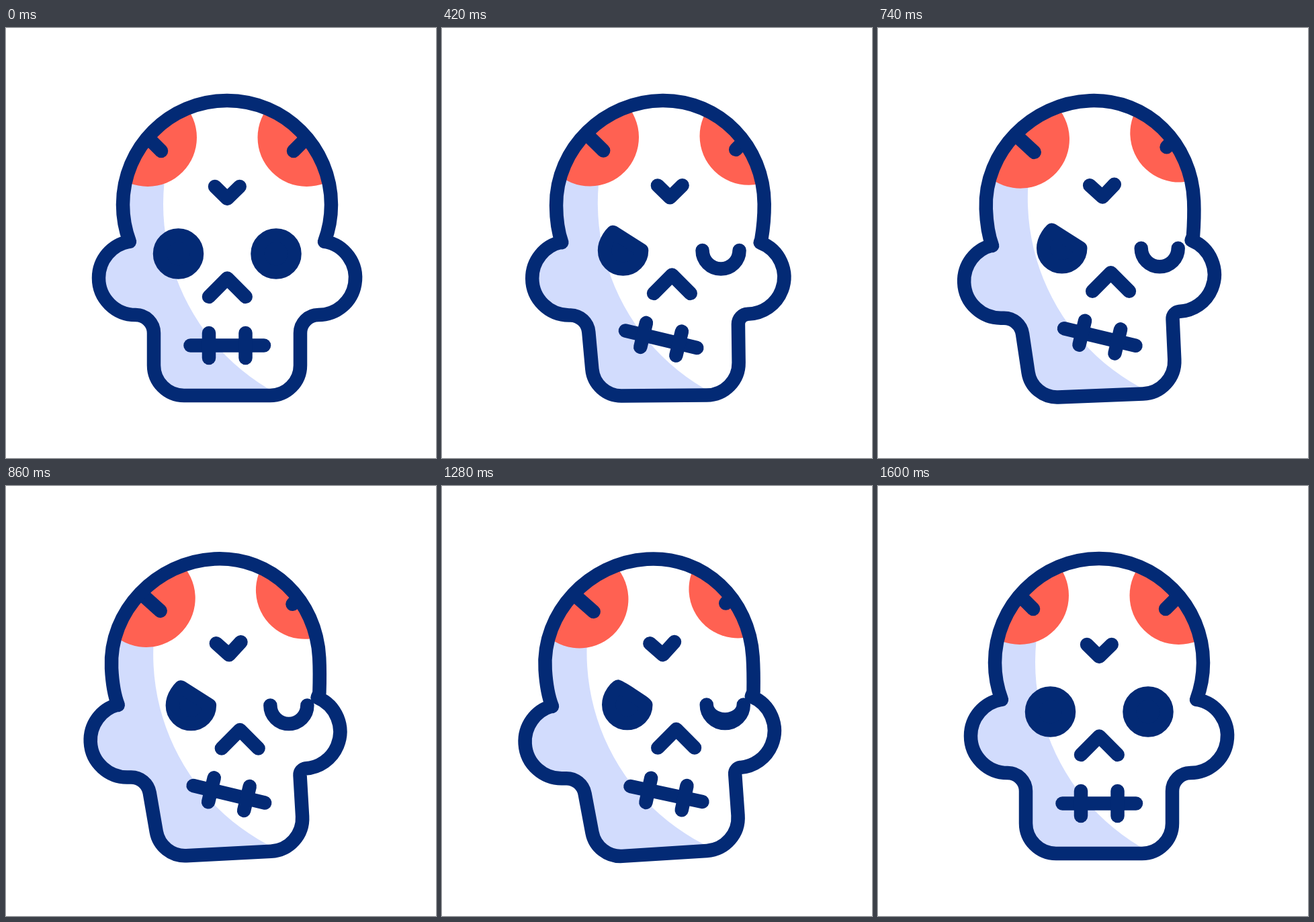
An HTML page with a canvas that plays this animation: 640 by 640 pixels, repeating every 1.9 s.

```html
<!DOCTYPE html>
<html lang="en">
<head>
<meta charset="utf-8">
<title>Winking skull</title>
<style>
  html, body { margin: 0; width: 100%; height: 100%; overflow: hidden; background: #fff; }
  canvas { display: block; width: 640px; height: 640px; }
</style>
</head>
<body>
<canvas id="stage" width="640" height="640"></canvas>
<script>
const ctx = document.getElementById('stage').getContext('2d');
const NAVY = '#032a75', RED = '#ff6152', SHADE = '#d2dcfd';
const LOOP = 1900, STEP = 20, RAD = Math.PI / 180;
const PIVOT = [330, 547];

const mix = (a, b, k) => a + (b - a) * k;

function ease(t, from, to) {
  const u = Math.min(1, Math.max(0, (t - from) / (to - from)));
  return u * u * (3 - 2 * u);
}

function poseAt(t) {
  const back = 1 - ease(t, 1200, 1600);
  const wink = ease(t, 110, 400) * back;
  const tilt = ease(t, 220, 1200) * back;
  return { wink, tilt, turn: mix(tilt, wink, 0.56) };
}

function line(...points) {
  ctx.beginPath();
  for (const [x, y] of points) ctx.lineTo(x, y);
  ctx.stroke();
}

function disc(x, y, r) {
  ctx.beginPath();
  ctx.arc(x, y, r, 0, 2 * Math.PI);
  ctx.fill();
}

function rotateAbout([x, y], degrees) {
  ctx.translate(x, y);
  ctx.rotate(degrees * RAD);
  ctx.translate(-x, -y);
}

function skullPath(turn) {
  const p = (x, y, dx, dy = 0) => [x + dx * turn, y + dy * turn];
  const jointL = p(184, 318, -6.5), jointR = p(474, 318, 5, -3);
  const left = p(174, 263, -3), top = p(329, 108, 4), right = p(484, 263, -3.5);
  const earL = p(193, 372, -4, -1), earR = p(465, 372, -15.5, -0.5);
  const neckL = p(220, 427, -5), neckR = p(438, 427, 6);
  const chinL = p(220, 547, 11.5), chinR = p(438, 547, 7);
  const angle = (from, to) => Math.atan2(to[1] - from[1], to[0] - from[0]);
  const k = 85.6;
  const path = new Path2D();

  path.moveTo(...jointL);
  path.bezierCurveTo(...p(177.3, 300.2, -5.5), left[0], left[1] + 19, ...left);
  path.bezierCurveTo(left[0], left[1] - k, top[0] - k, top[1], ...top);
  path.bezierCurveTo(top[0] + k, top[1], right[0], right[1] - k, ...right);
  path.bezierCurveTo(right[0], right[1] + 19, ...p(480.7, 300.2, -1, -2), ...jointR);
  path.arc(...earR, 55, angle(earR, jointR), Math.PI / 2);
  path.arcTo(...neckR, ...chinR, 27 - 20 * turn);
  path.arcTo(...chinR, ...chinL, 45 + 5 * turn);
  path.arcTo(...chinL, ...neckL, 45 - 2 * turn);
  path.arcTo(...neckL, earL[0], earL[1] + 55, 27 + turn);
  path.arc(...earL, 55, Math.PI / 2, angle(earL, jointL));
  path.closePath();
  return path;
}

function drawSkull({ turn, tilt }) {
  const skull = skullPath(turn);
  ctx.save();
  rotateAbout(PIVOT, -4.05 * tilt);

  ctx.save();
  ctx.clip(skull);
  ctx.fillStyle = SHADE;
  ctx.fillRect(80, 60, 480, 520);
  ctx.fillStyle = '#fff';
  disc(554, 262, 320);
  ctx.translate(19.7 * turn, -2 * turn);
  ctx.fillStyle = RED;
  disc(211, 163, 73);
  disc(447.5, 163, 73);
  line([231, 183], [171, 123]);
  line([428, 183], [488, 123]);
  ctx.restore();

  ctx.stroke(skull);
  ctx.translate(20.3 * turn, -2.6 * turn);
  line([311, 236], [329.3, 254], [347.7, 236]);
  ctx.restore();
}

// Both eyes share the lower half circle; only the upper lid changes.
function drawEye(x, y, upperLid) {
  const r = 27.5;
  ctx.save();
  ctx.translate(x, y);
  ctx.beginPath();
  ctx.arc(0, 0, r, 0, Math.PI);
  upperLid(r, r * 0.5523);
  ctx.closePath();
  ctx.fill();
  ctx.stroke();
  ctx.restore();
}

function drawFace({ wink, tilt, turn }) {
  ctx.save();
  ctx.translate(21.5 * turn, -7.6 * turn - 4 * tilt);
  ctx.fillStyle = NAVY;

  drawEye(256.5, 336, (r, h) => {
    const tx = -15 * wink, ty = mix(-r, -27, wink), open = h * (1 - wink);
    ctx.bezierCurveTo(-r, -h, tx - open, ty, tx, ty);
    ctx.bezierCurveTo(tx + open, ty, r, -open, r, 0);
  });
  drawEye(402, 336, (r, h) => {
    const lift = 2 * wink - 1;
    ctx.bezierCurveTo(-r, h * lift, -h, r * lift, 0, r * lift);
    ctx.bezierCurveTo(h, r * lift, r, h * lift, r, 0);
  });

  line([302, 400], [329.3, 372.5], [356.7, 400]);

  rotateAbout([339, 402], 13.5 * wink);
  line([274.5, 472.5], [384, 472.5]);
  for (const x of [302, 356.5]) line([x, 454], [x, 491]);
  ctx.restore();
}

function draw(t) {
  const pose = poseAt(t);
  ctx.fillStyle = '#fff';
  ctx.fillRect(0, 0, 640, 640);
  ctx.strokeStyle = NAVY;
  ctx.lineWidth = 20.5;
  ctx.lineCap = ctx.lineJoin = 'round';
  drawSkull(pose);
  drawFace(pose);
}

let start = null;
function tick(now) {
  if (start === null) start = now;
  const t = Math.max(0, now - start) % LOOP;
  draw(Math.floor(t / STEP) * STEP);
  requestAnimationFrame(tick);
}
draw(0);
requestAnimationFrame(tick);
</script>
</body>
</html>
```
